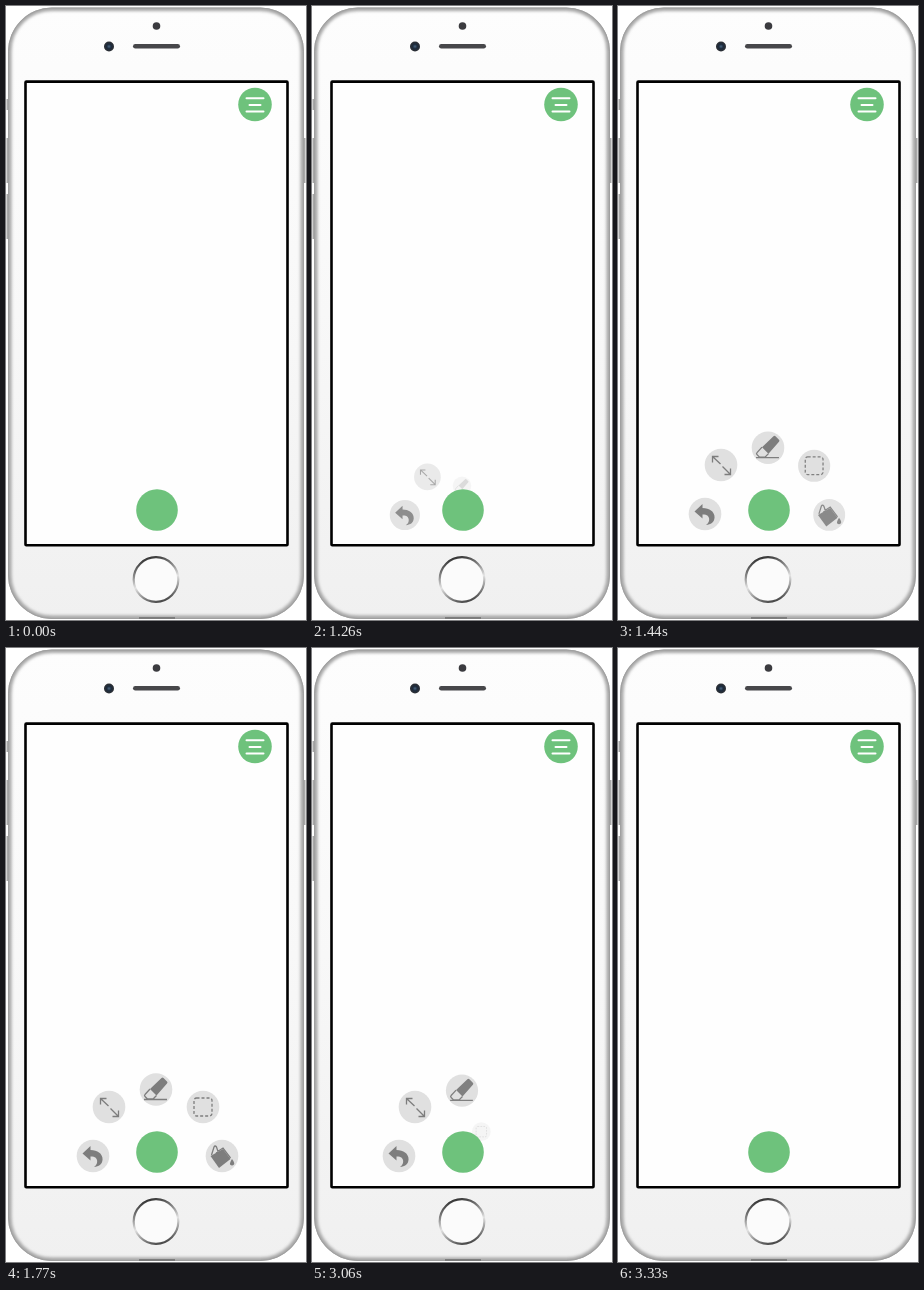
Recreate the animation shown at these times as an HTML page. Size 300 by 614 pixels, loop 3570 ms.

```html
<!DOCTYPE html>
<html lang="en">
<head>
<meta charset="utf-8">
<title>Radial tool menu</title>
<style>
  html, body { margin: 0; width: 100%; height: 100%; overflow: hidden; background: #fff; }
  svg { display: block; width: 100vw; height: 100vh; }
  .disc { fill: #e0e0e0; }
  .fill { fill: #7d7d7d; }
  .line { fill: none; stroke: #7d7d7d; stroke-width: 1.3; }
</style>
</head>
<body>
<svg viewBox="0 0 300 614">
  <defs>
    <linearGradient id="body" x1="0" y1="0" x2="0" y2="1">
      <stop offset="0" stop-color="#fdfdfd"/>
      <stop offset="0.5" stop-color="#f8f8f8"/>
      <stop offset="1" stop-color="#f0f0f0"/>
    </linearGradient>
    <linearGradient id="ring" x1="0.35" y1="0" x2="0.65" y2="1">
      <stop offset="0" stop-color="#333"/>
      <stop offset="0.3" stop-color="#8a8a8a"/>
      <stop offset="0.55" stop-color="#e4e4e4"/>
      <stop offset="0.8" stop-color="#8a8a8a"/>
      <stop offset="1" stop-color="#444"/>
    </linearGradient>
    <radialGradient id="lens">
      <stop offset="0" stop-color="#4a6580"/>
      <stop offset="0.45" stop-color="#1c2a3c"/>
      <stop offset="1" stop-color="#2e3034"/>
    </radialGradient>
    <filter id="soft" x="-5%" y="-5%" width="110%" height="110%">
      <feGaussianBlur stdDeviation="1.6"/>
    </filter>
    <clipPath id="case"><rect x="2" y="1.5" width="296" height="611.5" rx="44"/></clipPath>
  </defs>

  <!-- phone -->
  <g fill="#a8a8a8">
    <rect x="0.5" y="93" width="2" height="11"/>
    <rect x="0.5" y="132" width="2" height="45"/>
    <rect x="0.5" y="188" width="2" height="45"/>
    <rect x="297.5" y="132" width="2" height="45"/>
  </g>
  <g clip-path="url(#case)">
    <rect width="300" height="614" fill="url(#body)"/>
    <rect x="2" y="1.5" width="296" height="611.5" rx="44" fill="none" stroke="#a6a6a6" stroke-width="7" filter="url(#soft)"/>
  </g>
  <rect x="2.5" y="2" width="295" height="610.5" rx="43.5" fill="none" stroke="#a0a0a0"/>
  <path d="M133 612H169" stroke="#7c7c7c" stroke-width="2"/>
  <circle cx="150.5" cy="20" r="3.8" fill="#3b3b3f"/>
  <circle cx="103" cy="40.5" r="5" fill="url(#lens)"/>
  <rect x="127" y="38" width="47" height="4.6" rx="2.3" fill="#47474a"/>
  <circle cx="150" cy="573.5" r="22.3" fill="#fbfbfb" stroke="url(#ring)" stroke-width="2.2"/>
  <rect x="19.5" y="75.6" width="262" height="463.6" rx="0.8" fill="#fefefe" stroke="#000" stroke-width="2.6"/>

  <!-- menu button -->
  <circle cx="249" cy="98.5" r="16.8" fill="#6ec27c"/>
  <path d="M240.500 92.200H257.500M243.500 99H254.500M240.500 105.500H257.500" stroke="#fff" stroke-width="2" stroke-linecap="round"/>

  <!-- tools -->
  <g id="undo">
    <circle class="disc" r="16.3"/>
    <path class="fill" d="M-10.5-2.500L-2.500-10V-6C6-6 10-1 9.500 4C9 8.500 6 10.500 1 11C4 9 4.500 6.500 4 4C3 1 1 .5-2.500.5V4.500Z"/>
  </g>
  <g id="resize">
    <circle class="disc" r="16.3"/>
    <path class="line" d="M-8.500-8.500L-.5-1M-8.500-2.500V-8.500H-2.500M1.500 1.500L9.500 9.500M9.500 3.500V9.500H3.500"/>
  </g>
  <g id="eraser">
    <circle class="disc" r="16.3"/>
    <path class="fill" d="M5.500-11.500Q6.500-12.500 7.500-11.500L11-8Q12 -7 11-6L.5 6L-6-.5Z"/>
    <path class="line" d="M-6-.5L-11 5Q-12 6 -11 7L-8.500 9.500H-3L.5 6M-12 10H11"/>
  </g>
  <g id="marquee">
    <circle class="disc" r="16.3"/>
    <rect class="line" x="-9" y="-9" width="18" height="18" rx="2.5" stroke-dasharray="3 2"/>
  </g>
  <g id="bucket">
    <circle class="disc" r="16.3"/>
    <path class="fill" d="M-11.500 0L1-7L8.500 3L-3 12Z"/>
    <path class="line" d="M-10.500-1L-8-9Q-7-11 -5.500-9L-2.500 0M-6-3.500L1-8L8.500 2"/>
    <path class="fill" d="M10 3Q13 7 12 8.500Q10 10.500 8 8.500Q7.500 7 10 3Z"/>
  </g>

  <circle cx="151" cy="504" r="20.8" fill="#6ec27c"/>
</svg>
<script>
  const LOOP = 3570, STEP = 30;
  const OPEN_TIME = 300, CLOSE_TIME = 77;

  // from: hidden place, to: resting place, small: hidden scale
  const tools = [
    { id: "undo",    from: [151, 519], to: [87, 508],  small: 0.2,  open: 1146, close: 3155 },
    { id: "resize",  from: [151, 505], to: [103, 459], small: 0.3,  open: 1189, close: 3090 },
    { id: "eraser",  from: [150, 504], to: [150, 441.5], small: 0.3, open: 1232, close: 3040 },
    { id: "marquee", from: [151, 500], to: [197, 459], small: 0.3,  open: 1275, close: 2995 },
    { id: "bucket",  from: [151, 520], to: [216, 508], small: 0.7,  open: 1318, close: 2945 }
  ];
  for (const tool of tools) tool.el = document.getElementById(tool.id);

  const clamp = v => Math.min(1, Math.max(0, v));
  const mix = (a, b, p) => a + (b - a) * p;

  function progress(tool, t) {
    if (t < tool.close) return 1 - (1 - clamp((t - tool.open) / OPEN_TIME)) ** 5;
    return 1 - clamp((t - tool.close) / CLOSE_TIME) ** 3;
  }

  function draw(t) {
    for (const tool of tools) {
      const p = progress(tool, t);
      const x = mix(tool.from[0], tool.to[0], p);
      const y = mix(tool.from[1], tool.to[1], p);
      tool.el.setAttribute("transform", `translate(${x} ${y}) scale(${mix(tool.small, 1, p)})`);
      tool.el.setAttribute("opacity", p ** 1.4);
    }
  }

  const start = performance.now();
  function tick() {
    const t = (performance.now() - start) % LOOP;
    draw(Math.floor(t / STEP) * STEP);
    requestAnimationFrame(tick);
  }
  draw(0);
  requestAnimationFrame(tick);
</script>
</body>
</html>
```
